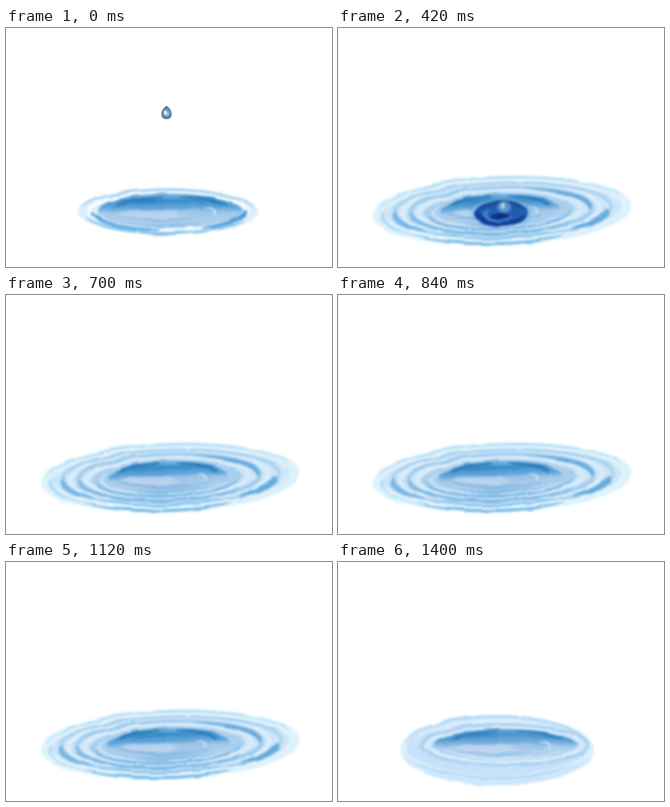
An HTML page for the animation above (1.54 s loop, 326 by 239 pixels).

```html
<!DOCTYPE html>
<html lang="en">
<head>
<meta charset="utf-8">
<title>Water drop</title>
<style>
html, body { margin: 0; width: 100%; height: 100%; overflow: hidden; background: #fff; }
svg { display: block; width: 326px; height: 239px; }
</style>
</head>
<body>
<svg id="stage" viewBox="0 0 326 239" xmlns="http://www.w3.org/2000/svg">
  <defs>
    <filter id="water" filterUnits="userSpaceOnUse" x="0" y="125" width="326" height="114" color-interpolation-filters="sRGB">
      <feTurbulence type="fractalNoise" baseFrequency=".03 .07" numOctaves="2" seed="4" result="n"/>
      <feDisplacementMap in="SourceGraphic" in2="n" scale="4" xChannelSelector="R" yChannelSelector="G"/>
      <feGaussianBlur stdDeviation="1.1 .8"/>
    </filter>
    <linearGradient id="deep" x1="0" y1="0" x2="0" y2="1">
      <stop offset="0" stop-color="#7bb9e5"/>
      <stop offset=".2" stop-color="#4393cf"/>
      <stop offset=".4" stop-color="#62a6da"/>
      <stop offset=".56" stop-color="#a3c8e9"/>
      <stop offset=".8" stop-color="#aecfed"/>
      <stop offset="1" stop-color="#74b4e3"/>
    </linearGradient>
    <linearGradient id="pale" x1="0" y1="0" x2="0" y2="1">
      <stop offset="0" stop-color="#a9d0f0"/>
      <stop offset=".25" stop-color="#5b9fd3"/>
      <stop offset=".45" stop-color="#7fb4df"/>
      <stop offset=".6" stop-color="#b3d2ee"/>
      <stop offset="1" stop-color="#a9cff0"/>
    </linearGradient>
    <radialGradient id="bead" cx=".5" cy=".58" r=".55">
      <stop offset="0" stop-color="#c5dcea"/>
      <stop offset=".4" stop-color="#83a9c2"/>
      <stop offset="1" stop-color="#3f6c8e"/>
    </radialGradient>
  </defs>
  <g id="pools" filter="url(#water)"></g>
  <g id="drop">
    <path d="M0-7C2.5-6 5.2-2.5 5.2 1C5.2 4.4 3 6.3 0 6.3S-5.2 4.4-5.2 1C-5.2-2.5-2.5-6 0-7Z" fill="url(#bead)"/>
    <ellipse cx="-1.4" cy="-.6" rx="1.2" ry="1.8" fill="#e6f2f8"/>
    <path d="M-3 3.4Q0 5.8 3 3.2" fill="none" stroke="#365f80" stroke-width="1"/>
  </g>
</svg>
<script>
const STEP = 140, COUNT = 11;
const pools = document.getElementById('pools');
const drop = document.getElementById('drop');

const oval = (x, y, rx, ry, fill, op = 1) =>
  `<ellipse cx="${x}" cy="${y}" rx="${rx}" ry="${ry}" fill="${fill}" opacity="${op}"/>`;

// Tapered brush stroke along an ellipse; angles in degrees, clockwise from the right.
function arc(x, y, rx, ry, from, to, w, fill, op = 1) {
  const outer = [], inner = [], n = 32;
  for (let i = 0; i <= n; i++) {
    const a = (from + (to - from) * i / n) * Math.PI / 180;
    const h = w / 2 * Math.sqrt(Math.sin(Math.PI * i / n));
    const at = s => `${(x + (rx + s * h * 1.6) * Math.cos(a)).toFixed(1)},${(y + (ry + s * h) * Math.sin(a)).toFixed(1)}`;
    outer.push(at(1));
    inner.unshift(at(-1));
  }
  return `<polygon points="${outer.concat(inner).join(' ')}" fill="${fill}" opacity="${op}"/>`;
}

const ring = (x, y, rx, ry, w, color, op = 1) =>
  `<ellipse cx="${x}" cy="${y}" rx="${rx}" ry="${ry}" fill="none" stroke="${color}" stroke-width="${w}" opacity="${op}"/>`;

// Dark streaks and glints on the middle of the water.
function streaks(x, y, k, dark) {
  return arc(x, y, 56 * k, 11, 196, 264, 4, dark, .8) +
    arc(x + 4, y, 56 * k, 12, 276, 346, 4, dark, .8) +
    arc(x, y - 1, 42 * k, 7, 205, 330, 2, dark, .5) +
    oval(x - 16 * k, y + 5, 34 * k, 4.5, '#c4d8f0', .7) +
    oval(x + 24 * k, y + 4, 18 * k, 3, '#9fc3e6', .7) +
    arc(x + 38 * k, y + 3, 7 * k, 4, 230, 400, 2, '#dcebf8', .7) +
    arc(x - 8, y + 3, 46 * k, 8, 40, 150, 1.6, '#7db2df', .7);
}

function calm(rx, ry) {
  const x = 162, y = 183.5;
  return oval(x, y, rx, ry, '#dceefb') +
    arc(x, y, rx - 3, ry - 2, 188, 352, 3, '#a3d0f1') +
    arc(x, y, rx - 5, ry - 2, 25, 165, 3.5, '#7fbfea') +
    ring(x, y, rx - 11, ry - 5, 4, '#f6fbff') +
    oval(164, 183, 72, 17.5, 'url(#deep)') +
    arc(x, y, rx - 15, ry - 5, 95, 178, 4.5, '#5ba7df') +
    arc(x, y, rx - 13, ry - 5, -5, 65, 4.5, '#4f9edb') +
    arc(x, y, rx - 17, ry - 7, 30, 160, 2, '#e3f1fc', .8) +
    streaks(164, 181, 1, '#2478ba');
}

// Rings tilt slightly up to the right; k is how far they have spread.
function ripples(k) {
  const x = 164, y = 182.5;
  return `<g transform="rotate(-2 164 182)">` +
    oval(x, y, 129, 35, '#dcf2fc') +
    oval(x, y, 119, 32, '#cce5f7') +
    arc(x, y, 125, 33, 185, 345, 2.4, '#b3dff6') +
    arc(x, y, 122, 32, 60, 135, 5, '#79bce9') +
    arc(x, y, 120, 31, 110, 185, 3, '#b0dbf5') +
    arc(x, y, 117 + k, 30, 5, 175, 2.6, '#eef8fe') +
    arc(x, y, 117 + k, 30, 185, 355, 2.4, '#eaf6fd') +
    ring(x, y, 109 + k, 27.5, 3, '#a9d2f0') +
    arc(x, y, 107 + k, 27, 135, 185, 4.5, '#79b7e5') +
    arc(x, y, 106 + k, 26.5, 5, 50, 5.5, '#66acdf') +
    arc(x, y, 107 + k, 27, 60, 130, 3.5, '#8cc4ec') +
    ring(x - 1, y, 99 + k, 25, 2.2, '#e6f3fc', .9) +
    ring(x - 1, y, 91 + k, 23, 4, '#a0cdef') +
    arc(x, y, 90 + k, 22.5, 40, 185, 4, '#7db9e6') +
    arc(x, y, 88 + k, 21.5, 285, 365, 4, '#68abdd') +
    ring(x - 2, y, 81 + k, 20.5, 2.2, '#e3f0fb', .9) +
    oval(161, 183, 75 + k, 18.5, '#a9cfee') +
    arc(161, 183, 73 + k, 18, 10, 170, 3, '#74b4e3') +
    arc(161, 183, 66 + k, 15.5, 20, 210, 2.4, '#d9eaf9', .85) +
    oval(162, 182, 60 + k, 16, 'url(#deep)') +
    `</g>` +
    streaks(160, 180, .88, '#2477b6') +
    arc(158, 183, 48, 9, 20, 170, 2.4, '#82b4e0', .8);
}

const crater = () =>
  oval(163, 185, 31, 14, '#8dbce6', .7) +
  oval(163, 185, 27, 13, '#225cb0') +
  arc(163, 185, 24, 10, 10, 200, 5, '#123f98') +
  arc(161, 186, 15, 6, 20, 240, 3, '#3f83cf') +
  arc(163, 184, 23, 10, 195, 345, 3, '#16488f') +
  oval(166, 179, 7, 6, '#5592c6') +
  oval(165, 178, 2, 3, '#b3d6ea') +
  oval(161, 188, 10, 3, '#102f83');

const rebound = () =>
  oval(163, 186, 24, 9, '#3576bd', .8) +
  arc(163, 186, 22, 8, 5, 190, 3, '#1c54a3') +
  `<path d="M154 187Q161 180 160 164Q164 160 167 164Q166 180 174 187Z" fill="#5794c8"/>` +
  oval(162, 177, 1.5, 7, '#c6e0f2');

function core(rx, ry) {
  const x = 167, y = 183;
  return ring(x, y, rx, ry, 3, '#a9cff0') +
    ring(x, y, rx - 6, ry - 2.5, 2.4, '#e0effc') +
    oval(x, y, rx - 11, ry - 5, 'url(#pale)') +
    arc(x, y, rx - 14, ry - 7, 190, 350, 6, '#4b96cd', .8) +
    arc(x, y, rx - 18, ry - 7, 25, 160, 2, '#e2f0fc', .8) +
    streaks(x, 181, 1, '#2b7fbd');
}

function wide() {
  const x = 164, y = 183;
  return oval(x, y, 156, 43, '#eaf6fe') +
    arc(x, y, 145, 39, 15, 170, 6, '#cfe8fb') +
    arc(x, y, 143, 38, 185, 265, 4, '#cbe6fb') +
    ring(x, y, 137, 36, 4, '#fafdff') +
    oval(x, y, 125, 34, '#d0e6fa') +
    arc(x, y, 121, 32, 195, 345, 4, '#bddbf5') +
    arc(x, y, 118, 31, 30, 155, 4, '#bbdbf6') +
    arc(x, y, 110, 27, 140, 225, 3, '#f0f8ff') +
    arc(x, y, 112, 28, -40, 45, 3, '#f0f8ff') +
    arc(x, y, 103, 26, 20, 165, 2.4, '#e6f3fe') +
    arc(x, y, 103, 25, 200, 335, 2.4, '#e4f2fe') +
    core(94, 21);
}

function settle() {
  const x = 159, y = 188;
  return oval(x, y, 97, 35, '#dceffd') +
    arc(x, y, 93, 33, 10, 170, 5, '#cbe6fb') +
    arc(x, y, 94, 33.5, 190, 350, 3, '#b3d9f3') +
    oval(x, y - 2, 90, 29, '#c5e0f8') +
    arc(x, y, 87, 27, 15, 165, 3, '#e1f0fd') +
    arc(x, y, 91, 28, 25, 155, 3, '#b5d8f5') +
    arc(x, y - 2, 85, 27, 190, 350, 3, '#e0f0fd') +
    core(83, 20);
}

const flat = ripples(0), spread = ripples(2);
const views = [
  calm(90, 23.5), calm(97.5, 25.5), calm(97.5, 25.5),
  flat + crater(), flat + rebound(),
  flat, spread, flat, spread,
  wide(), settle()
];
pools.innerHTML = views.map(v => `<g display="none">${v}</g>`).join('');

const dropY = { 0: 85, 1: 117, 2: 154, 4: 145 };
let shown = -1;

function draw(t) {
  const i = Math.floor(t / STEP) % COUNT;
  if (i === shown) return;
  shown = i;
  [...pools.children].forEach((g, n) => g.setAttribute('display', n === i ? 'inline' : 'none'));
  drop.setAttribute('display', i in dropY ? 'inline' : 'none');
  if (i in dropY) drop.setAttribute('transform', `translate(160.5 ${dropY[i]})`);
}

const start = performance.now();
function tick() {
  draw(performance.now() - start);
  requestAnimationFrame(tick);
}
tick();
</script>
</body>
</html>
```
